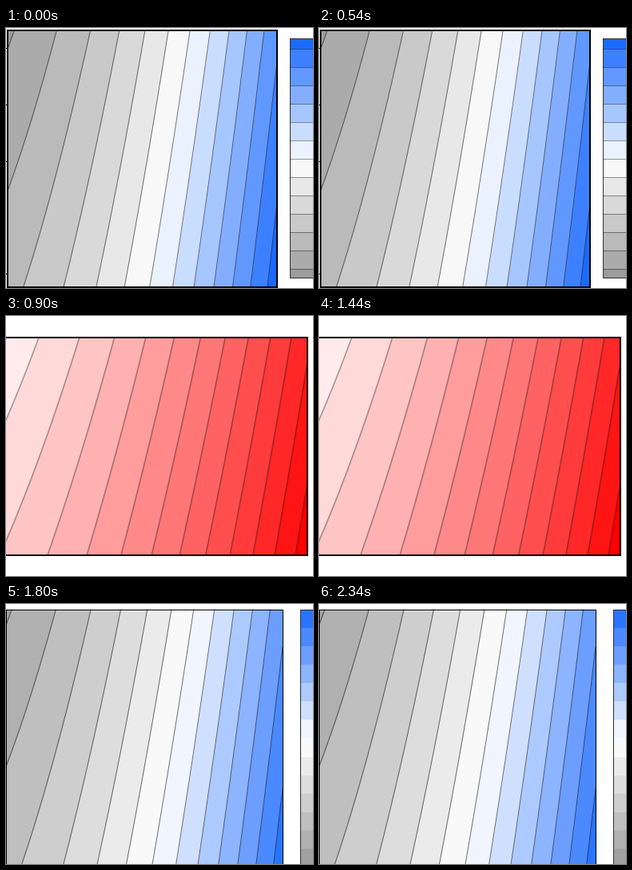
A matplotlib script that plays this animation: 384 px wide and 326 px high, repeating every 2700 ms.

```python
import numpy as np
import matplotlib.pyplot as plt
from matplotlib.animation import FuncAnimation
from matplotlib.patches import Rectangle

W, H, DPI = 384, 326, 64
PX = 72 / DPI  # points per pixel

GREY_BLUE = ["#9c9c9c", "#ababab", "#bababa", "#c9c9c9", "#d9d9d9", "#e8e8e8",
             "#f8f8f8", "#ebf2ff", "#c9ddff", "#a6c6ff", "#83aeff", "#6098ff",
             "#3d80ff", "#1a6aff"]
PALE_BLUE = ["#a1a1a1", "#b0b0b0", "#bfbfbf", "#cecece", "#dddddd", "#ebebeb",
             "#f9f9f9", "#f0f5ff", "#cfe0ff", "#adcaff", "#8cb4ff", "#6b9eff",
             "#4a89ff", "#2874ff"]
REDS = [(1, 1 - i / 13, 1 - i / 13) for i in range(1, 14)]

# box: left, top, right, bottom
# first, step, offset: contour k meets the top edge where
#   (x + offset)^2 = first + step * (k - 1)
# drift: contour levels gained from the top edge to the bottom edge
# line: opacity and width of the contours
PLOTS = [
    dict(box=(2, 3, 339, 325), colors=GREY_BLUE, offset=150, first=25700,
         step=19800, drift=1.81, line=(0.52, 1), frame=2,
         bar=(355, 13, 313), edge=26.4, pitch=23, rules=True,
         ticks=[25, 96, 167, 308]),
    dict(box=(-5, 27, 377, 300), colors=REDS, offset=230, first=73441,
         step=30125, drift=1.8, line=(0.36, 1.6), frame=2),
    dict(box=(0, 7, 346, 332), colors=PALE_BLUE, offset=155, first=26300,
         step=20930, drift=1.83, line=(0.55, 1), frame=1,
         bar=(368, 7, 332), edge=29.8, pitch=23.1, rules=False),
]

fig = plt.figure(figsize=(W / DPI, H / DPI), dpi=DPI, facecolor="white")
ax = fig.add_axes([0, 0, 1, 1])


def rect(x0, y0, x1, y1, **style):
    ax.add_patch(Rectangle((x0, y0), x1 - x0, y1 - y0, **style))


def draw_field(p):
    left, top, right, bottom = p["box"]
    alpha, width = p["line"]
    y = np.linspace(top, bottom, 600)
    gain = p["drift"] * (y - top) / (bottom - top)
    rect(left, top, right, bottom, fc=p["colors"][0], lw=0)
    curves = []
    for k, fill in enumerate(p["colors"][1:], 1):
        square = p["first"] + p["step"] * (k - 1 - gain)
        x = np.sqrt(np.maximum(square, 0)) - p["offset"]
        ax.fill_betweenx(y, np.clip(x, left, right), right, color=fill, lw=0)
        curves.append(np.where((x >= left) & (x <= right), x, np.nan))
    for x in curves:
        ax.plot(x, y, color="black", alpha=alpha, lw=width * PX)
    rect(left, top, right, bottom, fill=False, ec="black",
         lw=p["frame"] * PX, joinstyle="miter")


def draw_bar(p):
    left, top, bottom = p["bar"]
    start = top
    for i, fill in enumerate(p["colors"][::-1]):
        end = min(p["edge"] + i * p["pitch"], bottom)
        if i == len(p["colors"]) - 1:
            end = bottom
        rect(left, start, W + 5, end, fc=fill, lw=0)
        if p["rules"] and i:
            ax.plot([left, W], [start, start], color="black", alpha=0.4, lw=PX)
        start = end
    rect(left, top, W + 5, bottom, fill=False, ec="#303030", lw=PX)


def draw(i):
    p = PLOTS[i % len(PLOTS)]
    ax.clear()
    ax.set(xlim=(0, W), ylim=(H, 0))
    ax.axis("off")
    draw_field(p)
    if "bar" in p:
        draw_bar(p)
    for y in p.get("ticks", []):
        ax.plot([0, 2], [y, y], color="black", lw=PX)
    return []


anim = FuncAnimation(fig, draw, frames=len(PLOTS), interval=900,
                     init_func=lambda: [], repeat=True, repeat_delay=0)
plt.show()
```
